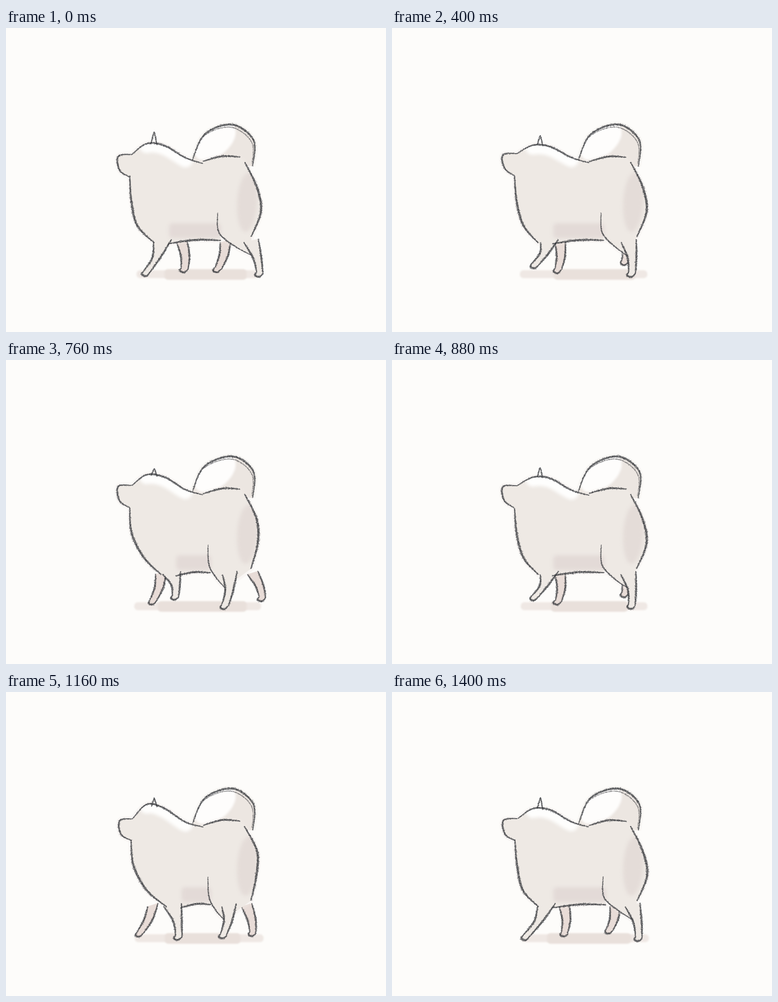
Write an HTML page with a canvas that moves like this. It is 720 by 576 pixels and loops after 1440 ms.

```html
<!DOCTYPE html>
<html>
<head>
<meta charset="utf-8">
<title>Walking dog</title>
<style>
html, body { margin: 0; width: 100%; height: 100%; overflow: hidden; background: #fdfcfa; }
canvas { display: block; }
</style>
</head>
<body>
<canvas id="stage" width="720" height="576"></canvas>
<script>
const ctx = document.getElementById('stage').getContext('2d');
const STEP = 40, LOOP = 36, CYCLE = 12;
const FUR = '#eee9e4', FAR_FUR = '#e8dcd7', STANCE = 0.58;

let random;
const seeded = seed => () => {
  seed = seed + 0x6D2B79F5 | 0;
  let t = Math.imul(seed ^ seed >>> 15, 1 | seed);
  t ^= t + Math.imul(t ^ t >>> 7, 61 | t);
  return ((t ^ t >>> 14) >>> 0) / 4294967296;
};
const spread = () => random() + random() - 1;

// Samples a Catmull-Rom spline; every redraw wobbles a little.
function curve(points) {
  const p = points.map(q => q.map(v => v + spread() * 0.8)), out = [];
  const at = i => p[Math.max(0, Math.min(p.length - 1, i))];
  for (let i = 0; i < p.length - 1; i++) {
    const a = at(i - 1), b = at(i), c = at(i + 1), d = at(i + 2);
    for (let t = 0; t <= 1; t += 0.125)
      out.push([0, 1].map(k => b[k] + t / 2 * (c[k] - a[k] +
        t * (2 * a[k] - 5 * b[k] + 4 * c[k] - d[k] + t * (3 * (b[k] - c[k]) + d[k] - a[k])))));
  }
  return out;
}

const reversed = points => [...points].reverse();
const shift = (points, dx, dy) => points.map(([x, y]) => [x + dx, y + dy]);

function shape(points) {
  const path = new Path2D();
  points.forEach(p => path.lineTo(p[0], p[1]));
  return path;
}

// A tapered soft core with dark grain scattered over it.
function pencil(points, width, tone = 0.6) {
  ctx.lineCap = 'butt';
  for (let i = 1; i < points.length; i++) {
    const [x, y] = points[i - 1], [x2, y2] = points[i];
    const length = Math.hypot(x2 - x, y2 - y);
    if (!length) continue;
    const w = width * (0.45 + 0.55 * Math.sin(Math.PI * i / points.length));
    ctx.strokeStyle = `rgba(62,64,67,${tone})`;
    ctx.lineWidth = w * 0.75;
    ctx.beginPath();
    ctx.moveTo(x, y);
    ctx.lineTo(x2, y2);
    ctx.stroke();
    ctx.fillStyle = `rgba(45,47,50,${tone * 0.7})`;
    for (let n = length * w * 0.6; n > 0; n--) {
      const t = random(), off = spread() * w * 0.7 / length;
      ctx.fillRect(x + (x2 - x) * t - (y2 - y) * off - 0.6,
        y + (y2 - y) * t + (x2 - x) * off - 0.6, 1.2, 1.2);
    }
  }
}

function blob(x, y, rx, ry, color, turn = 0) {
  ctx.fillStyle = color;
  ctx.beginPath();
  ctx.ellipse(x, y, rx, ry, turn, 0, 7);
  ctx.fill();
}

function band(x0, x1, y, height, color) {
  ctx.fillStyle = color;
  ctx.beginPath();
  ctx.roundRect(x0, y, x1 - x0, height, 7);
  ctx.fill();
}

function wash(path, color) {
  ctx.strokeStyle = ctx.fillStyle = color;
  ctx.globalAlpha = 0.3;
  ctx.lineWidth = 10;
  ctx.stroke(path);
  ctx.globalAlpha = 1;
  ctx.fill(path);
}

function soft(blur, paint, clip) {
  ctx.save();
  if (clip) ctx.clip(clip);
  ctx.filter = `blur(${blur}px)`;
  paint();
  ctx.restore();
}

// Foot slides back at walking speed on the ground, then swings forward in the air.
function limb(step, { start, from, to, floor, ease, lift, hip, reach }) {
  const u = ((step - start) / CYCLE + 2) % 1;
  const v = Math.max(0, (u - STANCE) / (1 - STANCE));
  const k = v ? 1 - v ** ease : u / STANCE;
  const foot = { x: from + (to - from) * k, y: floor - lift * Math.sin(Math.PI * v) };
  const top = { x: hip + reach * (foot.x - (from + to) / 2), y: 400 };
  return { foot, top, knee: { x: (foot.x + top.x) / 2 + 4, y: (foot.y + top.y) / 2 } };
}

function drawLeg({ foot, top, knee }, width, color, weight) {
  const front = curve([[top.x - width, top.y + 6], [knee.x - 8, knee.y], [foot.x - 5, foot.y - 8]]);
  const rear = curve([[top.x + width, top.y], [knee.x + 8, knee.y], [foot.x + 7, foot.y - 5]]);
  const paw = curve([[foot.x - 5, foot.y - 8], [foot.x - 8, foot.y - 2], [foot.x, foot.y + 1],
    [foot.x + 7, foot.y - 5]]);
  ctx.fillStyle = color;
  ctx.fill(shape([...front, ...paw, ...reversed(rear)]));
  [front, rear, paw].forEach(line => pencil(line, weight));
}

function drawTail() {
  const line = curve([[352, 253], [376, 202], [429, 183], [469, 212], [467, 262]]);
  const path = shape(line);
  wash(path, '#ece6e1');
  soft(2, () => blob(396, 215, 46, 27, '#fefdfc', -0.7), path);
  pencil(line, 4.6);
  pencil(shift(line.slice(8, 34), -3, 5), 2.2, 0.35);
}

function draw(frame) {
  const step = frame % CYCLE;
  const swing = (peak, size, period = CYCLE) => size * Math.cos(2 * Math.PI * (step - peak) / period);
  random = seeded(frame + 1);

  const fore = { start: 11, from: 253, to: 338, floor: 469, ease: 1, lift: 25, hip: 306, reach: 0.3 };
  const hind = { start: 5.5, from: 394, to: 486, floor: 471, ease: 2, lift: 17, hip: 440, reach: 0.6 };
  const nearHind = limb(step, hind);

  const sway = swing(3.5, 3), nod = swing(5.5, 4, CYCLE / 2), rise = swing(10, 5);
  const chestX = 291 + swing(4.5, 14), bellyX = 397 + swing(0, 10);
  const thighX = bellyX - 6, thighEnd = nearHind.knee.x - 8;
  const bridge = [239 + sway / 2, 238 + nod / 2];

  const snout = curve([[235 + sway, 280 + nod / 2], [216 + sway, 266 + nod],
    [213 + sway, 240 + nod], bridge]);
  const back = curve([bridge, [267, 217 + rise], [300, 222 + rise / 2], [340, 246], [373, 256]]);
  const saddle = curve([[373, 253], [410, 243], [444, 245]]);
  const rump = curve([[452, 254], [475, 301], [479 - swing(5, 4), 347], [464, 396]]);
  const thigh = curve([[thighX, 350], [thighX + 2, 388], [(thighX + thighEnd) / 2, 414],
    [thighEnd, 432]]);
  const belly = curve([[chestX + 26, 409], [(chestX + bellyX) / 2 + 14, 402], [bellyX, 403]]);
  const chest = curve([[235 + sway, 280], [239 + sway, 329], [257 + swing(5, 9), 375],
    [chestX, 407]]);

  ctx.fillStyle = '#fdfcfa';
  ctx.fillRect(0, 0, 720, 576);
  soft(1.5, () => {
    band(243 + spread() * 5, 485 + spread() * 5, 459, 15, '#efe8e4');
    band(300 + spread() * 20, 455 + spread() * 20, 457, 20, '#e9e0db');
  });
  drawTail();
  drawLeg(limb(step + 6, { ...fore, floor: 463, reach: 0.65 }), 10, FAR_FUR, 4.4);
  drawLeg(limb(step + 6, { ...hind, floor: 462 }), 10, FAR_FUR, 4.4);

  const body = shape([...snout, ...back, ...saddle, ...rump,
    ...reversed(thigh), ...reversed(belly), ...reversed(chest)]);
  wash(body, FUR);
  soft(3, () => {
    blob(457, 330, 19, 56, '#e4dcd8', 0.06);
    band(chestX + 28, bellyX, 370, 28, '#e3dad7');
    ctx.strokeStyle = '#fefefd';
    ctx.lineWidth = 28;
    ctx.lineJoin = ctx.lineCap = 'round';
    ctx.stroke(shape(shift(back.slice(9, 28), 0, 4)));
  }, body);

  drawLeg(limb(step, fore), 17, FUR, 4.6);
  drawLeg(nearHind, 14, FUR, 4.6);
  pencil(snout, 4);
  pencil(back, 4.2);
  pencil(saddle, 4.4);
  pencil(rump, 5.4);
  pencil(chest, 5.2);
  pencil(belly, 4.8);
  pencil(thigh, 3);

  const tip = [281, 200 - swing(2, 7)];
  pencil(curve([[275, 219 + rise / 2], tip]), 3);
  pencil(curve([tip, [286, 221 + rise / 2]]), 3);
}

let shown = -1;
function tick() {
  const frame = Math.floor(performance.now() / STEP) % LOOP;
  if (frame !== shown) draw(shown = frame);
  requestAnimationFrame(tick);
}
tick();
</script>
</body>
</html>
```
